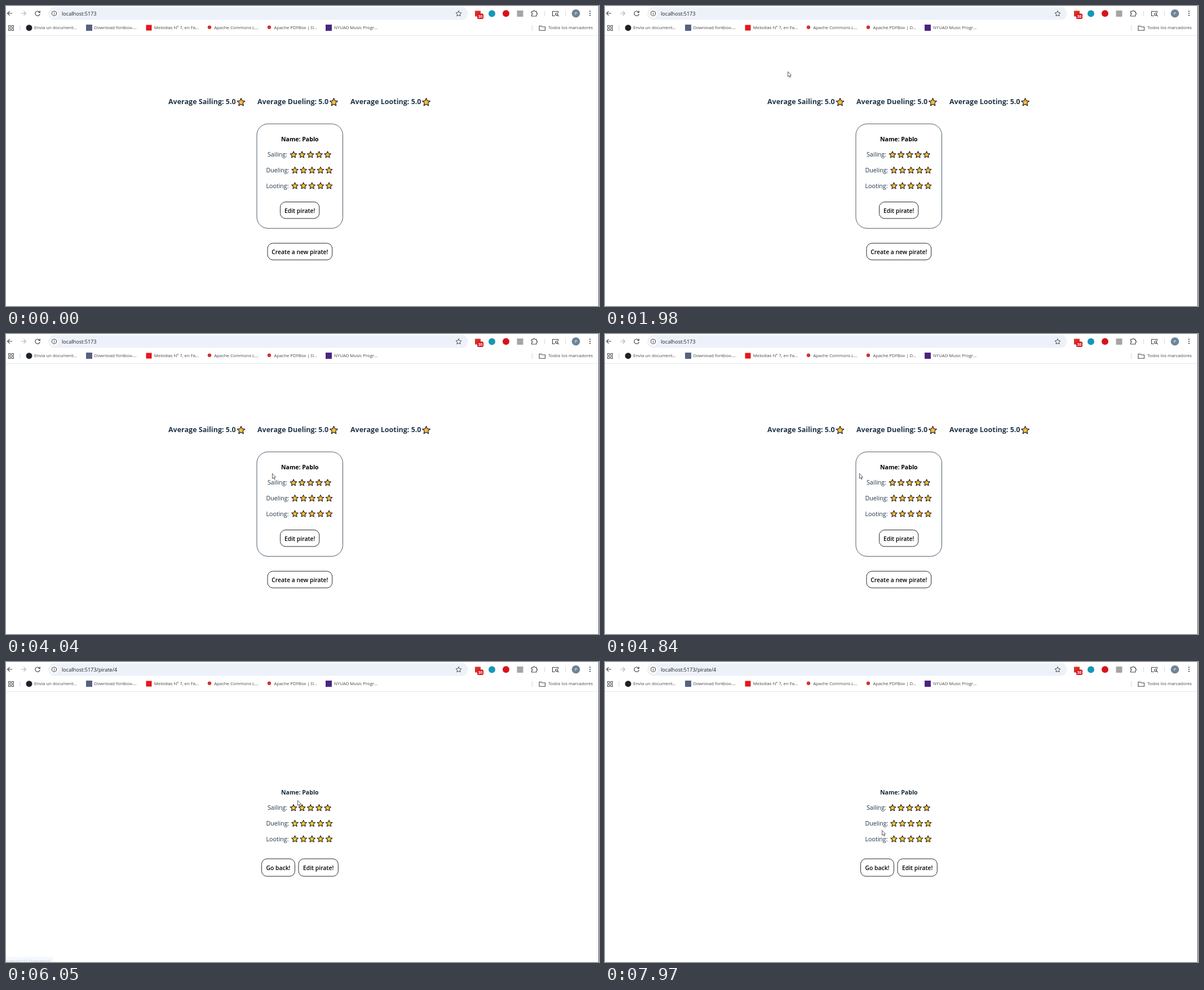
An HTML page with a canvas for the animation above (8 s loop, 1052 by 532 pixels).

```html
<!DOCTYPE html>
<html lang="es">
<head>
<meta charset="utf-8">
<title>Pirates</title>
<style>
html, body { margin: 0; width: 100%; height: 100%; overflow: hidden; background: #fff; }
canvas { display: block; }
</style>
</head>
<body>
<canvas id="stage" width="1052" height="532"></canvas>
<script>
const ctx = document.getElementById('stage').getContext('2d');
const LOOP = 8000, TICK = 66.6, FIRST = 180, PAGE_CHANGE = 5645;
const NAVY = '#213547', INK = '#1f1f1f', GREY = '#474747';

// Pointer track: time, x, y
const track = [
  [180, 997, 521], [510, 792, 344], [645, 792, 344], [915, 430, 133], [1050, 357, 178],
  [1245, 464, 227], [1510, 476, 225], [1580, 470, 215], [2380, 177, 16], [2450, 165, 14],
  [2780, 156, 13], [2912, 156, 13], [2980, 152, 14], [3780, 472, 241], [4040, 473, 247],
  [4245, 430, 263], [4440, 364, 210], [4510, 385, 179], [4640, 430, 240], [4980, 466, 252],
  [5310, 508, 238], [5850, 508, 238], [6045, 517, 245], [6250, 572, 256], [6710, 502, 226],
  [6780, 491, 224], [6980, 491, 224], [7245, 480, 229], [7375, 480, 229], [7640, 594, 248],
  [7970, 491, 298]
];

function pointerAt(t) {
  const i = track.findIndex(k => k[0] > t);
  if (i < 0) return track[track.length - 1].slice(1);
  const [t0, x0, y0] = track[i - 1], [t1, x1, y1] = track[i];
  const f = (t - t0) / (t1 - t0);
  return [x0 + (x1 - x0) * f, y0 + (y1 - y0) * f];
}

function text(str, x, y, size, color = INK, weight = 400, align = 'left') {
  ctx.font = `${weight} ${size}px "Open Sans", "Noto Sans", sans-serif`;
  ctx.fillStyle = color;
  ctx.textAlign = align;
  ctx.fillText(str, x, y);
}

function rect(x, y, w, h, color) {
  ctx.fillStyle = color;
  ctx.fillRect(x, y, w, h);
}

function disc(x, y, r, color) {
  ctx.fillStyle = color;
  ctx.beginPath();
  ctx.arc(x, y, r, 0, 7);
  ctx.fill();
}

function box(x, y, w, h, r, stroke, fill) {
  ctx.beginPath();
  ctx.roundRect(x, y, w, h, r);
  if (fill) { ctx.fillStyle = fill; ctx.fill(); }
  if (stroke) { ctx.strokeStyle = stroke; ctx.lineWidth = 1; ctx.stroke(); }
}

function line(d, color = GREY, width = 1.2) {
  ctx.strokeStyle = color;
  ctx.lineWidth = width;
  ctx.stroke(new Path2D(d));
}

function star(x, y, r, fill, stroke, width) {
  ctx.beginPath();
  for (let i = 0; i < 10; i++) {
    const a = i * Math.PI / 5 - Math.PI / 2, d = i % 2 ? r * 0.47 : r;
    ctx.lineTo(x + d * Math.cos(a), y + d * Math.sin(a));
  }
  ctx.closePath();
  ctx.lineJoin = 'round';
  if (fill) { ctx.fillStyle = fill; ctx.fill(); }
  ctx.strokeStyle = stroke;
  ctx.lineWidth = width;
  ctx.stroke();
}

function button(label, x, y, w, h, baseline) {
  box(x, y, w, h, 9.5, '#2a2a2a', '#fff');
  text(label, x + w / 2, baseline, 10.35, '#000', 600, 'center');
}

function toolbar(url, hover) {
  line('M11 13H3M6.5 9.2L2.7 13L6.5 16.8', GREY);
  line('M27 13H35M31.500 9.2L35.3 13L31.500 16.8', '#b4b4b4');
  line('M59.600 11A4.200 4.200 0 1 0 60.200 13.800M60.300 8.500V11.500H57.300', GREY);
  box(75, 2, 744.5, 22.5, 11.25, null, hover ? '#e1e5ec' : '#edf2fa');
  disc(85.5, 13.2, 7.5, '#fff');
  line('M81.300 13.200a4.200 4.200 0 1 0 8.400 0a4.200 4.200 0 1 0 -8.400 0M85.500 12.600V15.500M85.500 10.700V11.700', GREY, 1.1);
  text(url, 99, 17, 9.15);
  star(803, 13.7, 5.2, null, GREY, 1);

  rect(832, 8.5, 10, 10, '#d93025');
  box(836, 13.5, 11, 9.5, 2, null, '#d8131b');
  text('30', 841.5, 21, 7, '#fff', 700, 'center');
  disc(862, 13.5, 6, '#1796b8');
  disc(887, 13.3, 6, '#d8121c');
  rect(906.5, 8, 11, 11, '#a5a5a5');
  line('M932.500 9.500H935.500A1.500 1.500 0 0 1 938.500 9.500H941V12.200A1.500 1.500 0 0 1 941 15.200V18H932.500V15.300A1.500 1.500 0 0 0 932.500 12.300Z', GREY);
  rect(955, 9, 1, 9, '#c9dcf5');
  line('M974 17.500H969.500V9.500H979.500V12M974.800 14.500a2 2 0 1 0 4 0a2 2 0 1 0 -4 0M978.300 16L980.500 18.300', GREY);
  rect(992, 9, 1, 9, '#c9dcf5');
  disc(1011, 13.2, 7.3, '#6c8496');
  text('P', 1011, 16, 7.5, '#fff', 400, 'center');
  for (const y of [9.3, 13, 16.7]) disc(1036, y, 1.1, GREY);
}

function bookmarks() {
  for (const x of [4.5, 10]) for (const y of [34.5, 40]) {
    ctx.strokeStyle = GREY;
    ctx.lineWidth = 1;
    ctx.strokeRect(x, y, 3.5, 3.5);
  }
  rect(24.5, 34, 1, 10, '#c9dcf5');
  disc(41, 38.7, 5.5, '#1d2125');
  rect(142, 33, 11, 11, '#56617f');
  rect(248.500, 33.5, 10, 10, '#e3161f');
  for (const x of [361, 467]) disc(x, 37.8, 3.2, '#d0332f');
  rect(567, 33, 11, 11, '#4b2580');
  ['Envia un document...', 'Download fontbox-...', 'Melodías Nº 7, en Fa...',
    'Apache Commons L...', 'Apache PDFBox | D...', 'NYUAD Music Progr...']
    .forEach((label, i) => text(label, 50 + i * 106.4, 41.3, 7.75, GREY));
  rect(933, 34, 1, 10, '#c9dcf5');
  line('M946 35.500H950L951.300 37H956.500V43.200H946Z', GREY, 1.1);
  text('Todos los marcadores', 962, 41.3, 7.75, GREY);
  rect(0, 52, 1052, 1, '#e4e6ea');
}

function ratings(y, nameColor, gold) {
  text('Name: Pablo', 521.3, y, 10.55, nameColor, 700, 'center');
  [['Sailing:', 464, 510], ['Dueling:', 461.5, 512.5], ['Looting:', 461.5, 512.5]].forEach(([label, x, sx], i) => {
    const base = y + 27.6 * (i + 1);
    text(label, x, base, 10.65, NAVY);
    for (let n = 0; n < 5; n++) star(sx + n * 15.15, base - 3.5, 6.1, gold, '#221c20', 1.1);
  });
}

function home() {
  [['Sailing', 288, 417], ['Dueling', 446, 581.5], ['Looting', 611, 745.5]].forEach(([skill, x, sx]) => {
    text(`Average ${skill}: 5.0`, x, 174.4, 12.5, NAVY, 700);
    star(sx, 170.8, 7.2, '#ffc23a', '#221c20', 1.2);
  });
  box(445, 209, 152.5, 185.3, 20, '#4a5a69');
  ratings(239.8, '#000', '#ffc23a');
  button('Edit pirate!', 486.5, 347.5, 69.3, 29.3, 367);
  button('Create a new pirate!', 464, 420.7, 114.7, 29.5, 440.3);
}

function detail() {
  ratings(234.8, '#172b3a', '#ffd02f');
  button('Go back!', 453.5, 349, 59, 31, 369);
  button('Edit pirate!', 519, 349, 70.3, 31, 369);
}

function statusBubble(t) {
  const alpha = Math.min((t - 5180) / 130, (6080 - t) / 160, 1);
  if (alpha <= 0) return;
  ctx.globalAlpha = alpha;
  box(-10, 523, 94.5, 20, 3, null, '#d3e3fd');
  text('localhost:5173/pirate/4', -5, 533.3, 7.75, GREY);
  ctx.globalAlpha = 1;
}

function pointer(t, beam) {
  if (t < FIRST) return;
  const [x, y] = pointerAt(t);
  ctx.save();
  ctx.translate(Math.round(x), Math.round(y));
  if (beam) {
    line('M-2 -4.500H2M0 -4.500V4.500M-2 4.500H2', '#333', 1);
  } else {
    const arrow = 'M.5 .5V9.300L2.500 7.500L4 10.700L5.300 10.100L3.900 7H6.500Z';
    ctx.fillStyle = '#fff';
    ctx.fill(new Path2D(arrow));
    line(arrow, '#4a4d58', 0.9);
  }
  ctx.restore();
}

function draw(now) {
  const elapsed = now % LOOP;
  const t = FIRST + Math.floor((elapsed - FIRST + 4) / TICK) * TICK;
  const onDetail = t >= PAGE_CHANGE, hover = t > 2440 && t < 3040;
  rect(0, 0, 1052, 532, '#fff');
  toolbar('localhost:5173' + (onDetail ? '/pirate/4' : ''), hover);
  bookmarks();
  onDetail ? detail() : home();
  statusBubble(t);
  rect(1051, 0, 1, 532, '#5c5c5c');
  pointer(t, hover);
}

const start = performance.now();
function frame() {
  draw(performance.now() - start);
  requestAnimationFrame(frame);
}
frame();
</script>
</body>
</html>
```
